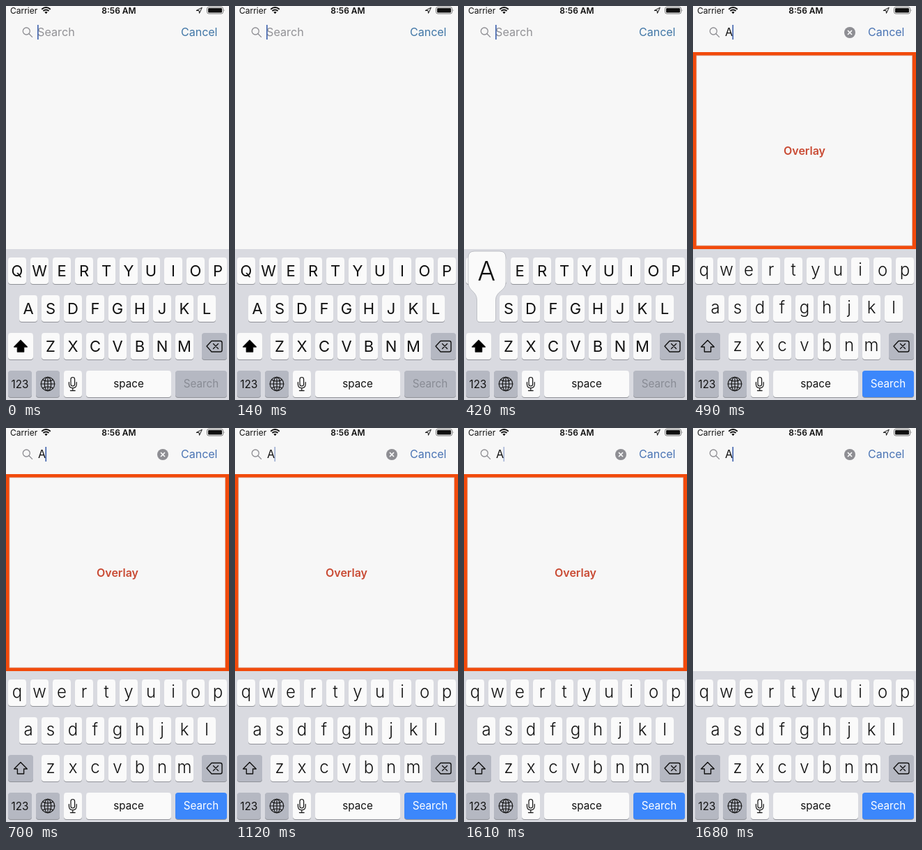
Recreate the animation shown at these times as an HTML page. Size 320x564 px, loop 1750 ms.

```html
<!DOCTYPE html>
<html lang="en">
<head>
<meta charset="utf-8">
<title>Search overlay</title>
<style>
  html, body { margin: 0; width: 100%; height: 100%; overflow: hidden; background: #f7f7f7; }
  svg { display: block; width: 320px; height: 564px; font-family: Inter, Roboto, sans-serif; }
  .mid { text-anchor: middle; }
  .line { fill: none; stroke: #111; stroke-width: 1.4; stroke-linejoin: round; stroke-linecap: round; }
</style>
</head>
<body>
<svg viewBox="0 0 320 564">
  <rect width="320" height="564" fill="#f7f7f7"/>

  <!-- status bar -->
  <g font-size="12" fill="#111">
    <text x="6" y="11">Carrier</text>
    <text x="162" y="11" class="mid" font-weight="600">8:56 AM</text>
    <g fill="none" stroke="#111" stroke-width="1.9">
      <path d="M51.2 4.8Q57.5 -.6 63.8 4.8M53.4 7.1Q57.5 3.8 61.6 7.1"/>
    </g>
    <path d="M55.3 8.8Q57.5 7 59.7 8.8L57.5 11.2Z"/>
    <path d="M273.3 6.4L281.3 2.3L277.5 10.4L277 6.8Z" class="line" stroke-width="1" style="stroke-width:1"/>
    <rect x="288.5" y="1.5" width="23" height="9.5" rx="2.4" fill="none" stroke="#777"/>
    <rect x="290" y="3" width="20" height="6.5" rx="1.2"/>
    <path d="M312.8 4.6Q314.4 6.2 312.8 7.9Z" fill="#777"/>
  </g>

  <!-- search bar -->
  <g fill="none" stroke="#8e8e93" stroke-width="1.3">
    <circle cx="29.3" cy="36" r="5"/><path d="M33 39.7L37.6 44.4" stroke-linecap="round"/>
  </g>
  <text id="hint" x="45" y="43" font-size="16.2" fill="#929296">Search</text>
  <g id="typed">
    <text x="46" y="43" font-size="16.2" fill="#111">A</text>
    <circle cx="225" cy="38" r="8" fill="#8e8e93"/>
    <path d="M222 35l6 6m0-6l-6 6" stroke="#fff" stroke-width="1.6"/>
  </g>
  <rect id="caret" y="27" width="1.7" height="21" fill="#4668b0"/>
  <text id="cancel" x="251" y="43" font-size="16">Cancel</text>

  <g id="overlay">
    <path d="M0 66H320V348H0ZM5 71V343H314.5V71Z" fill="#f24a0b" fill-rule="evenodd"/>
    <rect x="5" y="71" width="309.5" height="272" fill="none" stroke="#d7b5a8" stroke-width=".8"/>
    <text x="160" y="213" class="mid" font-size="16" font-weight="600" fill="#c94a33">Overlay</text>
  </g>

  <!-- keyboard -->
  <rect y="348" width="320" height="216" fill="#d9dae0"/>
  <g id="keys"></g>
  <g id="upper" class="mid" font-size="22" fill="#111"></g>
  <g id="lower" class="mid" font-size="24" font-weight="300" fill="#111"></g>
  <path id="shift" class="line" d="M21 478.6L30.3 488H25.6V495H16.4V488H11.7Z"/>
  <g class="line">
    <path d="M288 487L295 479.5H307.5Q310 479.5 310 482V492.5Q310 495 307.5 495H295Z"/>
    <path d="M297.5 483.5l7 7m0-7l-7 7"/>
    <g style="stroke-width:1.1">
      <circle cx="60" cy="541" r="9.8"/><ellipse cx="60" cy="541" rx="4.7" ry="9.8"/>
      <path d="M60 531.2V550.8M50.2 541H69.8M52.6 535.2Q60 538.8 67.4 535.2M52.6 546.8Q60 543.2 67.4 546.8"/>
    </g>
    <g style="stroke-width:1.2">
      <rect x="93" y="531.5" width="5.6" height="12.5" rx="2.8"/>
      <path d="M90.4 538.5V541.5Q90.6 546.8 95.8 546.8T101.2 541.5V538.5M95.8 546.8V550.5M92.4 550.6H99.2"/>
    </g>
  </g>
  <g class="mid" font-size="15.2" fill="#111">
    <text x="20" y="547">123</text>
    <text x="176" y="546">space</text>
    <text id="go" x="280" y="546">Search</text>
  </g>

  <g id="popup">
    <path id="bubble" fill="#fafafa" stroke="#b4b6bd" stroke-width=".8"
      d="M15 351H51Q60 351 60 360V396C60 408 45.5 408 45.5 421V448Q45.5 452.5 41 452.5H23Q18.5 452.5 18.5 448V421C18.5 408 6 408 6 396V360Q6 351 15 351Z"/>
    <text x="32.3" y="393" class="mid" font-size="38" font-weight="300" fill="#111">A</text>
  </g>
</svg>
<script>
const $ = id => document.getElementById(id);
const WHITE = '#fafafa', GRAY = '#b5b8c2';

function add(parent, tag, attrs, text = '') {
  const node = document.createElementNS('http://www.w3.org/2000/svg', tag);
  for (const name in attrs) node.setAttribute(name, attrs[name]);
  node.textContent = text;
  return parent.appendChild(node);
}

function key(x, y, width, fill = WHITE) {
  const shape = { x, width, height: 38, rx: 4 };
  add($('keys'), 'rect', { ...shape, y: y + 1, fill: '#909298' });
  return add($('keys'), 'rect', { ...shape, y, fill });
}

[['QWERTYUIOP', 3], ['ASDFGHJKL', 19], ['ZXCVBNM', 51]].forEach(([letters, left], row) => {
  [...letters].forEach((letter, i) => {
    const x = left + 32 * i, y = 360 + 54 * row;
    key(x, y, 26);
    add($('upper'), 'text', { x: x + 13, y: y + 27 }, letter);
    add($('lower'), 'text', { x: x + 13, y: y + 25.5 }, letter.toLowerCase());
  });
});
const shiftKey = key(3, 468, 36);
key(281, 468, 36, GRAY);
key(3, 522, 34, GRAY);
key(43, 522, 34, GRAY);
key(83, 522, 26);
key(115, 522, 122);
const goKey = key(243, 522, 74);

const LOOP = 1750, STEP = 70, PRESS = 420, TYPED = 490, DISMISS = 1680;
const clamp = v => Math.max(0, Math.min(1, v));
const show = (id, on) => $(id).style.display = on ? '' : 'none';

// The caret rests, fades out and back, then starts a second fade.
function caretOpacity(t) {
  if (t < TYPED || t >= DISMISS) return 1;
  if (t >= 1540) return clamp(1 - (t - 1470) / 250);
  return Math.max(clamp(1 - (t - 910) / 420), clamp((t - 1260) / 210));
}

function draw(now) {
  const t = Math.floor(now % LOOP / STEP) * STEP;
  const typed = t >= TYPED;
  show('hint', !typed);
  show('typed', typed);
  show('upper', !typed);
  show('lower', typed);
  show('popup', t >= PRESS && !typed);
  show('overlay', typed && t < DISMISS);
  $('caret').setAttribute('x', typed ? 56.4 : 45);
  $('caret').setAttribute('opacity', caretOpacity(t));
  $('cancel').setAttribute('fill', typed ? '#4a74b4' : '#4076a6');
  $('shift').style.fill = typed ? 'none' : '#000';
  shiftKey.setAttribute('fill', typed ? GRAY : WHITE);
  goKey.setAttribute('fill', typed ? '#3c87fb' : GRAY);
  $('go').setAttribute('fill', typed ? '#fff' : '#888b94');
}

const start = performance.now();
function tick() {
  draw(performance.now() - start);
  requestAnimationFrame(tick);
}
tick();
</script>
</body>
</html>
```
